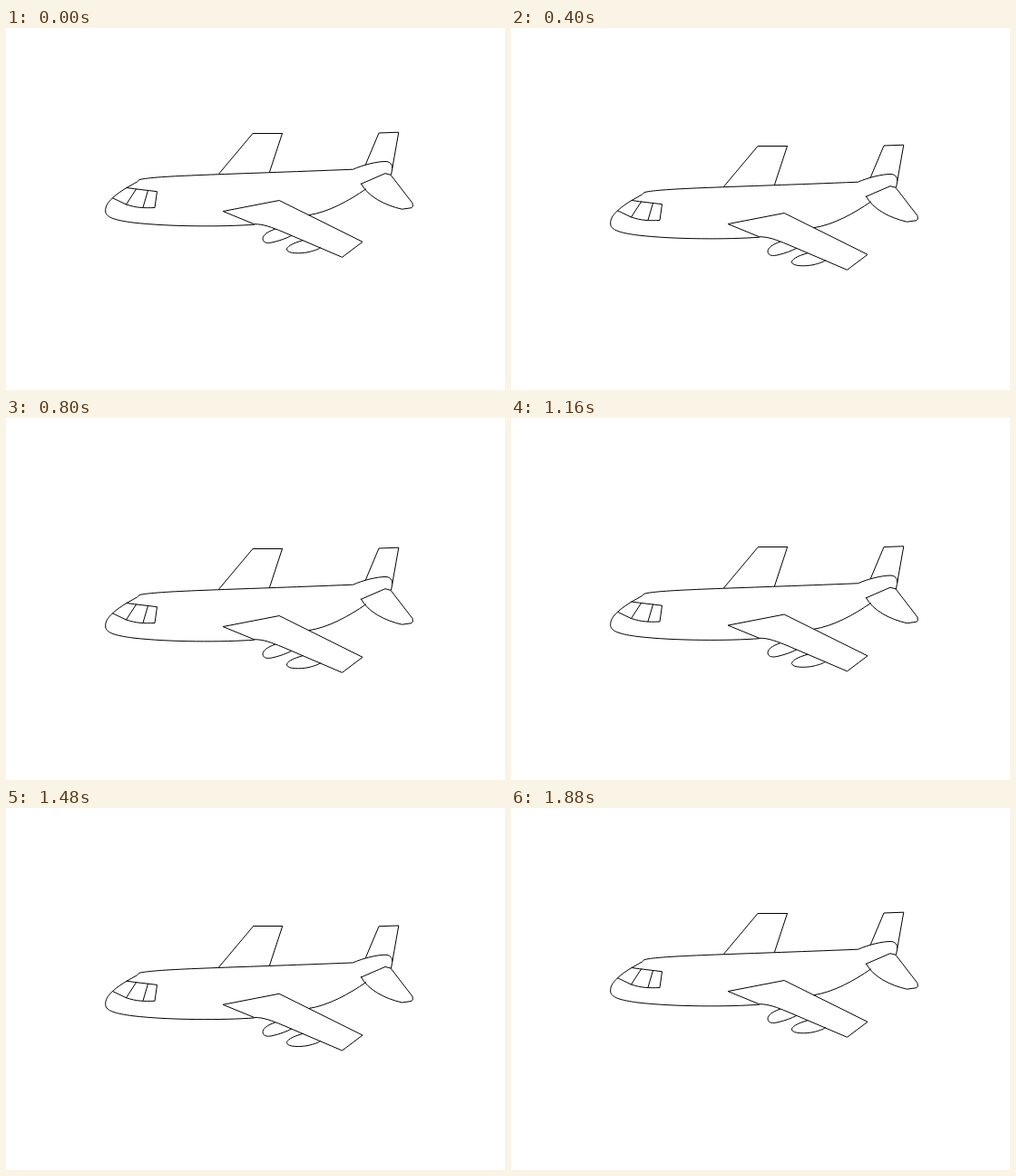
Animation of 550 by 400 pixels, one loop 1.92 s. Source, as an HTML page:

```html
<!DOCTYPE html>
<html lang="en">
<head>
<meta charset="utf-8">
<title>Hovering plane</title>
<style>
  html, body { margin: 0; width: 100%; height: 100%; overflow: hidden; background: #fff; }
  svg { display: block; width: 550px; height: 400px; }
  path { fill: none; stroke: #000; stroke-width: 1; stroke-linejoin: round; stroke-linecap: round; }
  .flat { shape-rendering: crispEdges; stroke-linecap: butt; }
</style>
</head>
<body>
<svg viewBox="0 0 550 400">
  <g id="plane">
    <!-- far wing and fin -->
    <path d="M234.5 161.3L272 116.5M304.5 116.5L290.5 159.2"/>
    <path class="flat" d="M271.5 116.1H305"/>
    <path d="M396.5 150.5L411 116L432.8 115.2L425.8 155"/>
    <!-- fuselage -->
    <path d="M273.5 217.2C240 219.7 180 219.7 140 215C121 212.5 110.5 209.5 109.7 203
      C109.3 197 112 193 117.5 187.8C122 183.5 128 179.5 133 176.5L144.5 170L147 167.6
      C165 163 240 162 382.5 156.2C393 151.5 409 147.3 419 147.5C425 148 426.5 153 425.5 157L424.5 162"/>
    <path d="M334 206.7C355 203.5 378 191 396.5 178"/>
    <!-- tailplane -->
    <path d="M391.5 172.2L418 160.7L424 162.3L448 193.5Q449.3 198 447 198.7L436.5 200.2C418 196 399 186.5 391.5 172.2Z"/>
    <!-- near wing -->
    <path d="M239.5 202.7L273.5 216.7C284 216.6 293 220.3 305 225.2L370.5 253.3L393 236.3L301.5 190.7Z"/>
    <!-- engines -->
    <path d="M296.5 222.3C288 225 283 229 283 233C283.5 238 289 238 294 236.8C302 235 309 232.3 314.5 229.5"/>
    <path d="M327 234.7C315 238 309 242 309.5 245C311 249.7 325 249.3 333 247.7C340 246 344 244.7 346.5 242.7"/>
    <!-- cockpit windows -->
    <path d="M133 176.5C145 178.3 155 179.2 166.5 180.7L164 198.5C152 199 144 198.8 132.5 195L117.5 187.8"/>
    <path d="M143.5 178L132.5 195M156.5 179.5L151 198.3"/>
  </g>
</svg>
<script>
  const plane = document.getElementById('plane');
  const TICK = 40, TICKS = 48, DROP = 28;
  const FALL_END = 20, RISE_START = 28, RISE_END = 47;

  function offset(tick) {
    if (tick <= FALL_END) return DROP * tick / FALL_END;
    if (tick <= RISE_START) return DROP;
    return DROP * (RISE_END - tick) / (RISE_END - RISE_START);
  }

  const start = performance.now();
  function draw(now) {
    const tick = Math.floor(Math.max(0, now - start) / TICK) % TICKS;
    plane.setAttribute('transform', `translate(0 ${offset(tick).toFixed(2)})`);
    requestAnimationFrame(draw);
  }
  draw(start);
</script>
</body>
</html>
```
